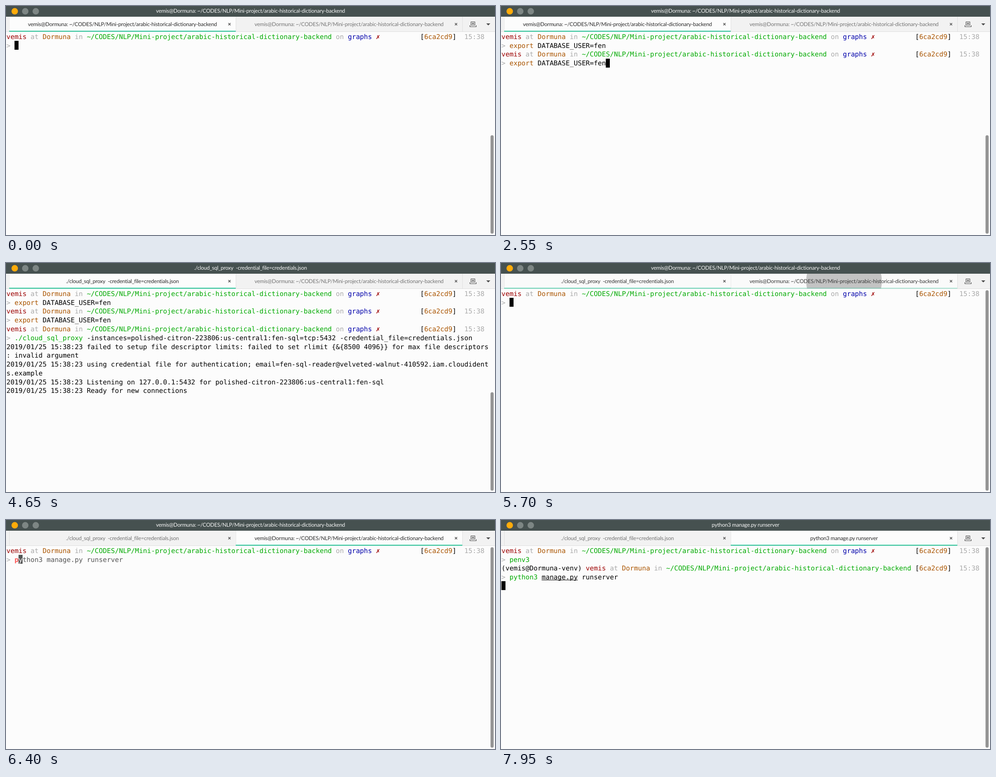
Write an HTML page with a canvas that moves like this. It is 1092 px wide and 513 px high and loops after 8000 ms.

```html
<!DOCTYPE html>
<html lang="en">
<head>
<meta charset="utf-8">
<title>Terminal session</title>
<style>
  html, body { margin: 0; width: 100%; height: 100%; overflow: hidden; background: #fcfcfc; }
  canvas { display: block; }
</style>
</head>
<body>
<canvas id="stage" width="1092" height="513"></canvas>
<script>
const ctx = document.getElementById('stage').getContext('2d');
const LOOP = 8000, RUN_PROXY = 4100, SWITCH_TAB = 5700, RUN_SERVER = 7950;
const CELL = 8.97, LINE = 19.77, LEFT = 1, TOP = 58.7, BASELINE = 15.2;
const MONO = '14.9px "DejaVu Sans Mono", monospace';
const UI = '12px Lato, sans-serif';
const PAPER = '#fcfcfc', BLACK = '#000', RED = '#9c0000', ORANGE = '#aa5500', GREEN = '#0a0',
      BLUE = '#0000aa', GREY = '#aaa', HINT = '#555', ERROR = '#f55';

const PATH = '~/CODES/NLP/Mini-project/arabic-historical-dictionary-backend';
const SHELL_TITLE = 'vemis@Dormuna: ' + PATH;
const PROXY_TITLE = './cloud_sql_proxy  -credential_file=credentials.json';
const SERVER_TITLE = 'python3 manage.py runserver';
const EXPORT = [['export', ORANGE], [' DATABASE_USER=fen', BLACK]];
const INSTANCE = 'polished-citron-223806:us-central1:fen-sql';
const STAMP = '2019/01/25 15:38:23 ';
const LOG = [
  STAMP + 'failed to setup file descriptor limits: failed to set rlimit {&{8500 4096}} for max file descriptors',
  ': invalid argument',
  STAMP + 'using credential file for authentication; email=fen-sql-reader@velveted-walnut-410592.iam.cloudident',
  's.example',
  STAMP + 'Listening on 127.0.0.1:5432 for ' + INSTANCE,
  STAMP + 'Ready for new connections'
];

// keys: [time, typed characters, colour, other suggestion]
const ALL = Infinity;
const FIRST_TAB = [
  { start: 0, enter: 1450, runs: EXPORT,
    keys: [[0, 0], [500, 1, ERROR], [800, 2, GREEN], [900, 4, ERROR], [1400, ALL]] },
  { start: 1450, enter: 2850, runs: EXPORT,
    keys: [[1450, 0], [2000, 1, ERROR], [2100, 2, GREEN], [2150, 3, ERROR], [2500, ALL]] },
  { start: 2850, enter: RUN_PROXY,
    runs: [['./cloud_sql_proxy', GREEN],
           [` -instances=${INSTANCE}=tcp:5432 -credential_file=credentials.json`, BLACK]],
    keys: [[2850, 0], [3500, 1, GREEN], [3850, 2, BLACK], [4000, ALL]] }
];
const SECOND_TAB = [
  { start: SWITCH_TAB, enter: 7000, runs: [['penv3', GREEN]],
    keys: [[SWITCH_TAB, 0], [6400, 1, ERROR, SERVER_TITLE], [6500, 2, ERROR],
           [6750, 3, ERROR], [6950, ALL]] },
  { start: 7050, enter: RUN_SERVER, venv: true,
    runs: [['python3', GREEN], [' ', BLACK], ['manage.py', BLACK, true], [' runserver', BLACK]],
    keys: [[7050, 0], [7400, 1, ERROR], [7500, 2, ERROR]] }
];

const clamp = v => Math.max(0, Math.min(1, v));
const mix = (a, b, k) => a + (b - a) * k;
const grey = v => `rgb(${v},${v},${v})`;

function rect(x, y, w, h, color) {
  ctx.fillStyle = color;
  ctx.fillRect(x, y, w, h);
}

function disc(x, y, r, color) {
  ctx.fillStyle = color;
  ctx.beginPath();
  ctx.arc(x, y, r, 0, 7);
  ctx.fill();
}

function strokes(path, color, width) {
  ctx.strokeStyle = color;
  ctx.lineWidth = width;
  ctx.stroke(new Path2D(path));
}

function label(text, x, y, color) {
  ctx.font = UI;
  ctx.letterSpacing = '-0.23px';
  ctx.textAlign = 'center';
  ctx.fillStyle = color;
  ctx.fillText(text, x, y);
  ctx.letterSpacing = '0px';
}

// Writes on the character grid and returns the next column.
function write(row, col, text, color, underline) {
  const x = LEFT + col * CELL, y = TOP + row * LINE + BASELINE;
  ctx.font = (color === ERROR ? 'bold ' : '') + MONO;
  ctx.textAlign = 'left';
  ctx.fillStyle = color;
  [...text].forEach((ch, i) => ctx.fillText(ch, x + i * CELL, y));
  if (underline) ctx.fillRect(x, Math.round(y + 1), text.length * CELL, 1);
  return col + text.length;
}

const writeRuns = (row, col, runs) =>
  runs.reduce((c, [text, color, underline]) => write(row, c, text, color, underline), col);

function cursor(row, col, ch) {
  const x = Math.round(LEFT + col * CELL), y = Math.round(TOP + row * LINE - 0.3);
  rect(x, y, 9, 20, ch ? HINT : BLACK);
  if (ch) write(row, col, ch, PAPER);
}

function prompt(row, venv) {
  const place = [['vemis', RED], [' at ', GREY], ['Dormuna', ORANGE], [' in ', GREY], [PATH, GREEN]];
  if (venv) writeRuns(row, 0, [['(vemis@Dormuna-venv) ', BLACK], ...place]);
  else writeRuns(row, 0, [...place, [' on ', GREY], ['graphs', BLUE], [' ✗', RED]]);
  writeRuns(row, 103, [['[', BLACK], ['6ca2cd9', ORANGE], [']', BLACK], ['  15:38', GREY]]);
  write(row + 1, 0, '>', GREY);
}

function command(row, { runs, keys, enter }, t) {
  const [, count, color, other] = keys.filter(k => k[0] <= t).pop();
  if (t >= enter || count === ALL) {
    const end = writeRuns(row, 2, runs);
    if (t < enter) cursor(row, end);
    return;
  }
  const full = other || runs.map(r => r[0]).join('');
  if (!count) return cursor(row, 2);
  const col = write(row, 2, full.slice(0, count), color, full.startsWith('./') && count === 2);
  write(row, col + 1, full.slice(count + 1), HINT);
  cursor(row, col, full[count]);
}

function terminal(t) {
  const session = t < SWITCH_TAB ? FIRST_TAB : SECOND_TAB;
  session.forEach((entry, i) => {
    if (t < entry.start) return;
    prompt(i * 2, entry.venv);
    command(i * 2 + 1, entry, t);
  });
  if (t >= RUN_PROXY && t < SWITCH_TAB) {
    LOG.forEach((text, i) => write(6 + i, 0, text, BLACK));
    if (t < 4650 || t >= 5250) cursor(12, 0);
  }
  if (t >= 7000 && t < 7050) cursor(2, 0);
  if (t >= RUN_SERVER) cursor(4, 0);

  const barTop = t < SWITCH_TAB ? 289.5 : 61;
  ctx.fillStyle = '#959595';
  ctx.beginPath();
  ctx.roundRect(1082, barTop, 7, 510 - barTop, 3.5);
  ctx.fill();
}

function tab(x, title, light, active, ripple) {
  const center = x + 253;
  rect(x, 24, 506, 33, grey(mix(242, 252, light)));
  if (ripple) {
    ctx.save();
    ctx.beginPath();
    ctx.rect(x, 24, 506, 33);
    ctx.clip();
    disc(center, 40.5, ripple.radius, `rgba(0,0,0,${ripple.alpha})`);
    ctx.restore();
  }
  rect(x, 24, 1, 33, 'rgba(0,0,0,.07)');
  rect(x + 506, 24, 1, 33, 'rgba(0,0,0,.07)');
  ctx.globalAlpha = active;
  rect(x, 55.6, 506, 1.8, '#0abf8c');
  ctx.globalAlpha = 1;
  label(title, center, 44.7, grey(mix(118, 45, light)));
  strokes(`M${x + 489.5} 38.2l5 5m0-5l-5 5`, '#555', 1.5);
}

function chrome(t) {
  const firstTitle = t < RUN_PROXY ? SHELL_TITLE : PROXY_TITLE;
  const secondTitle = t < RUN_SERVER ? SHELL_TITLE : SERVER_TITLE;
  rect(0, 0, 1092, 24, '#465150');
  disc(19.5, 11.8, 7.2, '#ffab0a');
  disc(43, 11.8, 7.2, '#7d8684');
  disc(66.5, 11.8, 7.2, '#7d8684');
  label(t < SWITCH_TAB ? firstTitle : secondTitle, 546, 15.2, '#f6f6f6');

  rect(0, 24, 1092, 33, '#f2f2f2');
  rect(0, 57, 1092, 1, '#dedede');
  const since = t - SWITCH_TAB;
  const switched = since < 0 ? 0 : clamp(0.35 + since / 300);
  const hover = 0.8 * clamp((t - 5250) / 150);
  const grow = 1 - (1 - clamp(since / 250)) ** 2;
  const ripple = since >= 0 && since < 400 &&
    { radius: mix(83, 256, grow), alpha: 0.22 * (1 - since / 400) };
  const firstLight = since < 0 ? 1 : 1 - clamp((since + 50) / 300);
  tab(7, firstTitle, firstLight, 1 - switched);
  tab(513, secondTitle, Math.max(hover, switched), switched, ripple);

  strokes('M1038.5 35.5h8.5v7.5h-8.5zM1036 43v3.5h14v-3.5M1042.8 36.8v5m-2.5-2.5h5', '#4a4a4a', 1.2);
  ctx.fillStyle = '#4a4a4a';
  ctx.fill(new Path2D('M1072.5 39h9l-4.5 4.5z'));
}

function draw() {
  const t = performance.now() % LOOP;
  ctx.textRendering = 'geometricPrecision';
  rect(0, 0, 1092, 513, PAPER);
  chrome(t);
  terminal(t);
  requestAnimationFrame(draw);
}
draw();
</script>
</body>
</html>
```
